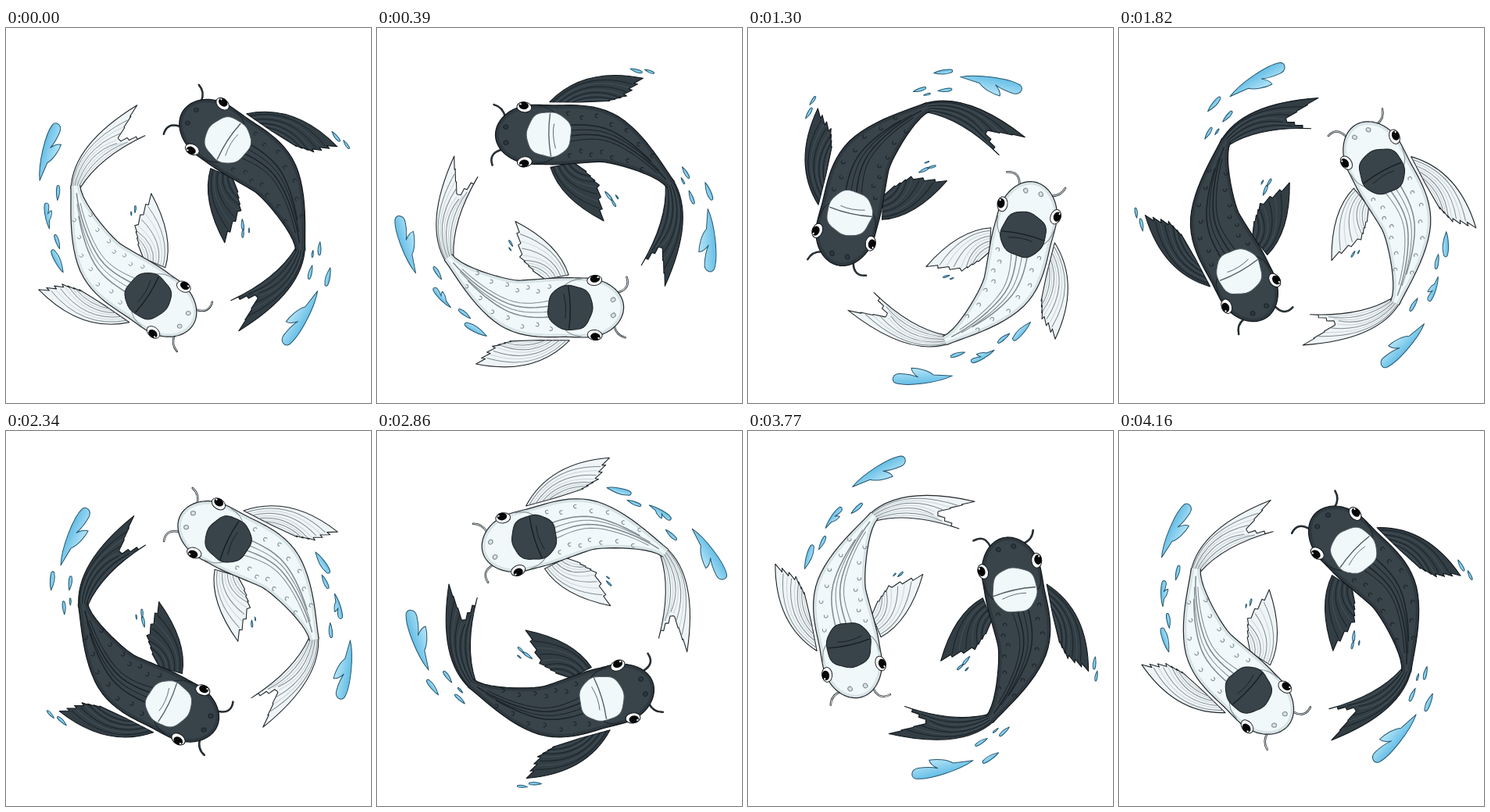
Write an HTML page with a canvas that moves like this. It is 467x480 px and loops after 4290 ms.

```html
<!DOCTYPE html>
<html lang="en">
<head>
<meta charset="utf-8">
<title>Circling koi</title>
<style>
html, body { margin: 0; width: 100%; height: 100%; overflow: hidden; background: #fff; }
canvas { display: block; width: 467px; height: 480px; }
</style>
</head>
<body>
<canvas id="stage"></canvas>
<script>
const STEP = 130, STEPS = 33, TAU = Math.PI * 2, DEG = Math.PI / 180;
const canvas = document.getElementById('stage');
const dpr = window.devicePixelRatio || 1;
canvas.width = 467 * dpr;
canvas.height = 480 * dpr;
const g = canvas.getContext('2d');

// The pair turns as one piece: [step, degrees]
const turns = [[0, 0], [6, 68.2], [14, 152.2], [18, 187.2], [22, 229.9], [26, 281], [32, 350], [33, 360]];

const dark = {
  skin: '#38434a', fin: '#323d44', line: '#10161a', mark: '#1a2228', soft: 'rgba(12,18,22,.22)',
  glow: 'rgba(120,138,148,.25)', spot: '#f0f8fa', spotLine: '#4d585e', whisker: '#38434a'
};
const light = {
  skin: '#f0f8fa', fin: '#eff5f7', line: '#20262a', mark: '#7e898e', soft: 'rgba(120,140,150,.2)',
  glow: 'rgba(100,110,116,.25)', spot: '#38434a', spotLine: '#151c20', whisker: '#dfe7ea'
};

// Both fish share this shape, drawn heading up and left
const knots = [[171, 66], [227, 104], [283, 142], [345, 191], [377, 283], [352, 328]];
const tail = { root: [377, 283], outer: [298, 386], inner: [288, 347], notch: [322, 343],
               bendOut: [381, 335], bendIn: [347, 319] };
const fins = [
  { front: [308, 108], lead: [370, 95], tip: [424, 150], rim: [394, 157], heel: [372, 150], back: [340, 130] },
  { front: [262, 178], lead: [250, 218], tip: [280, 273], rim: [301, 232], heel: [297, 208], back: [290, 190] }
];

// Water: angle, radius, length, forked
const drops = [
  [-41, 188, 80, 1], [-23, 168, 18], [-22, 191, 24], [-12, 170, 17], [-15, 163, 9],
  [30, 216, 16], [26, 223, 13], [-4, 68, 14], [-13, 70, 11], [-9, 77, 6],
  [154, 200, 76, 1], [168, 172, 19], [178, 181, 33, 1], [189, 171, 19], [197, 176, 32],
  [168, 71, 9], [173, 75, 5]
];

const mix = (a, b, t) => a + (b - a) * t;
const mixP = (a, b, t) => [mix(a[0], b[0], t), mix(a[1], b[1], t)];

function turnAt(step) {
  const i = turns.findIndex(k => k[0] > step);
  const [a, b] = [turns[i - 1], turns[i]];
  return mix(a[1], b[1], (step - a[0]) / (b[0] - a[0])) * DEG;
}

function halfWidth(u) {
  if (u < .75) return 38 * Math.sqrt(Math.max(0, 1 - (1 - u / .75) ** 2));
  return 6 + 16 * (1 + Math.cos(Math.PI * Math.min(1, (u - .75) / 2.25) ** 2));
}

// Point at distance u along the spine, w to its outer side
function at(u, w = 0) {
  const i = Math.max(0, Math.min(2, Math.floor(u))), t = u - i;
  const pos = [], dir = [];
  for (let k = 0; k < 2; k++) {
    const [a, b, c, d] = knots.slice(i, i + 4).map(p => p[k]);
    const q = 2 * a - 5 * b + 4 * c - d, r = 3 * b - a - 3 * c + d;
    pos.push(b + .5 * t * (c - a + t * (q + t * r)));
    dir.push(c - a + t * (2 * q + 3 * t * r));
  }
  const len = Math.hypot(...dir);
  return [pos[0] + w * dir[1] / len, pos[1] - w * dir[0] / len];
}

function lines(pts) {
  pts.forEach(p => g.lineTo(...p));
}

function stroke(color, width) {
  g.strokeStyle = color;
  g.lineWidth = width;
  g.stroke();
}

function fill(color) {
  g.fillStyle = color;
  g.fill();
}

function curve(a, c, b, color, width) {
  g.beginPath();
  g.moveTo(...a);
  g.quadraticCurveTo(...c, ...b);
  stroke(color, width);
}

function oval(p, rx, ry, angle, color, line) {
  g.beginPath();
  g.ellipse(...p, rx, ry, angle, 0, TAU);
  if (color) fill(color);
  if (line) stroke(line, 1);
}

// Frayed edge from a to b, notched towards root
function fray(a, b, root, n, depth) {
  const out = [];
  for (let i = 0; i < n; i++) {
    out.push(mixP(a, b, i / n), mixP(mixP(a, b, (i + .6) / n), root, depth));
  }
  return [...out, b];
}

// Membrane between two bent sides, with rays running out to a frayed rim
function membrane(f, a, bendA, tip, mid, end, bendB, b, depth) {
  const root = mixP(a, b, .5);
  g.beginPath();
  g.moveTo(...a);
  g.quadraticCurveTo(...bendA, ...tip);
  lines([...fray(tip, mid, root, 3, depth), ...fray(mid, end, root, 3, depth)]);
  g.quadraticCurveTo(...bendB, ...b);
  g.closePath();
  fill(f.fin);
  stroke(f.line, 1.1);
  for (let i = 1; i < 9; i++) {
    const k = i / 9;
    const rim = k < .5 ? mixP(tip, mid, k * 2) : mixP(mid, end, k * 2 - 1);
    curve(mixP(a, b, k), mixP(bendA, bendB, k), mixP(rim, root, .1), i % 2 ? f.mark : f.glow, 1);
  }
}

function drawBody(f) {
  const rim = [];
  for (let i = -60; i <= 60; i++) {
    const u = 3 * (i / 60) ** 2;
    rim.push(at(u, Math.sign(i) * halfWidth(u)));
  }
  g.beginPath();
  lines(rim);
  fill(f.skin);
  g.save();
  g.clip();
  stroke(f.soft, 8);
  g.restore();
  g.beginPath();
  lines(rim);
  stroke(f.line, 1.2);
}

function drawMarks(f) {
  // Back fin folds
  for (let n = 0; n < 4; n++) {
    const w = n * 7 - 9, from = 1.35, to = 2.9 - .15 * Math.abs(n - 1);
    g.beginPath();
    for (let k = 0; k <= 1; k += .07) {
      g.lineTo(...at(mix(from, to, k), w * (1 - .7 * k) + 3 * Math.sin(k * Math.PI)));
    }
    stroke(f.mark, n % 2 ? 1.5 : 1);
  }
  for (const side of [-1, 1]) {
    // Scales, nostril and gill
    for (let i = 0; i < 7; i++) {
      const u = 1.35 + i * .2, p = at(u, side * halfWidth(u) * (i % 2 ? .58 : .72));
      g.beginPath();
      g.arc(...p, 2.3, 2, 6);
      stroke(f.mark, 1);
    }
    oval(at(.2, side * 10), 3, 2.6, 0, f.soft, f.mark);
    curve(at(.8, side * 37), at(1.02, side * 36), at(1.12, side * 27), f.mark, 1);
  }
}

function drawSpot(f) {
  g.beginPath();
  for (let a = 0; a < TAU; a += .1) {
    const r = 29 + .7 * Math.cos(4 * a) + .5 * Math.sin(7 * a);
    g.lineTo(284 + r * Math.cos(a), 142 + r * Math.sin(a));
  }
  g.closePath();
  fill(f.spot);
  stroke(f.spotLine, 1);
  curve(at(1.05, -27), at(.98, 0), at(1.02, 27), f.spotLine, 1.3);
  curve(at(1.12, -17), at(1.06, 0), at(1.1, 14), f.spotLine, .8);
}

function drawEye(f, side) {
  const tilt = 34 * DEG + side * .12;
  oval(at(.56, side * 35), 9.5, 6.5, tilt, '#fff', f.line);
  oval(at(.55, side * 37), 6.3, 4.8, tilt, '#050607');
  oval(at(.49, side * 39), 1.3, 1, tilt, '#fff');
}

function drawWhisker(f, base, bend, tip) {
  curve(base, bend, tip, f.line, 2.5);
  curve(base, bend, tip, f.whisker, 1);
}

function drawFish(f) {
  const t = tail;
  membrane(f, at(2.95, 6), t.bendOut, t.outer, t.notch, t.inner, t.bendIn, at(2.95, -6), .06);
  for (const p of fins) {
    membrane(f, p.front, p.lead, p.tip, p.rim, p.heel, mixP(p.heel, p.back, .5), p.back, .08);
  }
  drawWhisker(f, [250, 92], [255, 80], [247, 71]);
  drawWhisker(f, [222, 124], [206, 119], [202, 134]);
  drawBody(f);
  drawMarks(f);
  drawSpot(f);
  drawEye(f, 1);
  drawEye(f, -1);
}

function drawDrop([deg, r, len, forked]) {
  const angle = deg * DEG;
  g.save();
  g.translate(235 + r * Math.cos(angle), 245 - r * Math.sin(angle));
  g.rotate(-angle - Math.PI / 2 - 10 * DEG);
  g.scale(len, len);
  g.beginPath();
  g.moveTo(.5, .02);
  g.bezierCurveTo(.25, .12, -.28, .15, -.47, .07);
  g.bezierCurveTo(-.54, .02, -.5, -.09, -.38, -.08);
  if (forked) {
    g.quadraticCurveTo(-.2, -.06, -.08, 0);
    g.quadraticCurveTo(-.18, -.08, -.18, -.16);
    g.bezierCurveTo(-.06, -.15, .1, -.1, .18, -.02);
    g.lineTo(.5, .02);
  } else {
    g.bezierCurveTo(-.1, -.17, .2, -.09, .5, .02);
  }
  g.closePath();
  const water = g.createLinearGradient(0, -.15, 0, .15);
  water.addColorStop(0, '#b4e4f7');
  water.addColorStop(1, '#5bb9e4');
  fill(water);
  stroke('#24566f', 1 / len);
  g.restore();
}

function render(now) {
  const step = Math.floor(now / STEP) % STEPS;
  g.setTransform(dpr, 0, 0, dpr, 0, 0);
  g.fillStyle = '#fff';
  g.fillRect(0, 0, 467, 480);
  g.lineJoin = g.lineCap = 'round';
  g.translate(239.5, 244);
  g.rotate(-turnAt(step));
  g.translate(-239.7, -242.2);
  drops.forEach(drawDrop);
  drawFish(dark);
  // The light fish is the dark one turned half round
  g.translate(466, 483);
  g.rotate(Math.PI);
  drawFish(light);
}

function loop() {
  render(performance.now());
  requestAnimationFrame(loop);
}
loop();
</script>
</body>
</html>
```
